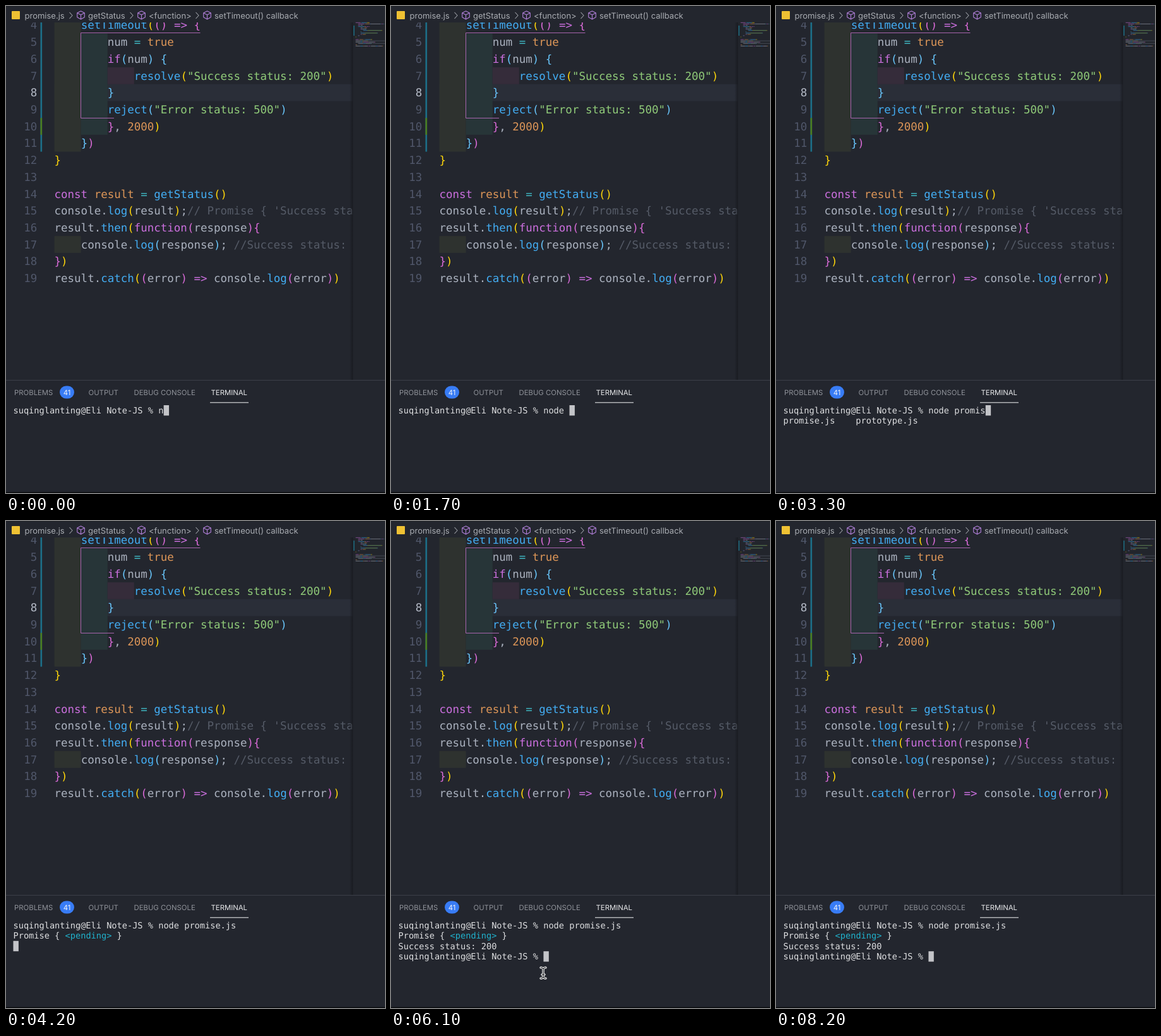
Recreate the animation shown at these times as an HTML page. Size 600x771 px, loop 8.3 s.

```html
<!DOCTYPE html>
<html lang="en">
<head>
<meta charset="utf-8">
<title>Promise in the terminal</title>
<style>
  html, body { margin: 0; width: 100%; height: 100%; overflow: hidden; background: #23262e; }
  svg { display: block; width: 600px; height: 771px; }
  text { white-space: pre; text-rendering: geometricPrecision; }
  .code { font: 17.47px "DejaVu Sans Mono", monospace; }
  .term { font: 13.64px "DejaVu Sans Mono", monospace; fill: #dedfe1; }
  .crumb { font: 13px Inter, sans-serif; fill: #a9acb2; }
  .tab { font: 11.35px Inter, sans-serif; fill: #8f9299; }
</style>
</head>
<body>
<svg id="stage" viewBox="0 0 600 771" xmlns="http://www.w3.org/2000/svg">
  <defs>
    <clipPath id="view"><rect y="26" width="549" height="566"/></clipPath>
    <linearGradient id="shade">
      <stop offset="0" stop-color="#15171c" stop-opacity="0"/>
      <stop offset="1" stop-color="#15171c" stop-opacity=".75"/>
    </linearGradient>
  </defs>
  <rect width="600" height="771" fill="#23262e"/>
  <g id="editor" clip-path="url(#view)"></g>
  <rect x="544" y="26" width="5.5" height="566" fill="url(#shade)"/>
  <g id="map"></g>
  <g id="crumbs"></g>
  <g id="panel"></g>
  <g id="terminal"></g>
  <g id="mouse" fill="none" stroke-linecap="round">
    <path id="beam" d="M-4-8.5Q-1-8.5 0-6.5Q1-8.5 4-8.5M0-6.5V6.5M-4 8.5Q-1 8.5 0 6.5Q1 8.5 4 8.5M-2 2.5H2" stroke="#f2f2f2" stroke-width="3"/>
    <use href="#beam"/>
    <path d="M-4-8.5Q-1-8.5 0-6.5Q1-8.5 4-8.5M0-6.5V6.5M-4 8.5Q-1 8.5 0 6.5Q1 8.5 4 8.5M-2 2.5H2" stroke="#15171b" stroke-width="1.1"/>
  </g>
</svg>
<script>
const LOOP = 8300, STEP = 100;
const ROW = 26.71, COL = 10.517, LEFT = 76.6;
const TROW = 16.4, TCOL = 8.212, TLEFT = 11.5;
const $ = id => document.getElementById(id);

function add(parent, tag, attrs, content) {
  const el = document.createElementNS("http://www.w3.org/2000/svg", tag);
  for (const k in attrs) el.setAttribute(k, attrs[k]);
  if (content !== undefined) el.textContent = content;
  parent.appendChild(el);
  return el;
}
const rect = (parent, x, y, width, height, fill, more) =>
  add(parent, "rect", { x, y, width, height, fill, ...more });

// "~k" switches to colour k for the text after it
const COLORS = {
  g: "#abb2bf", p: "#cb6fde", b: "#43adf3", o: "#dd9658", c: "#3fb6c1",
  s: "#90cb79", m: "#555b67", 1: "#ffd60a", 2: "#da6bd8", 3: "#69c6fb"
};
const CODE = [
  "~pfunction ~bgetStatus~1() {",
  "    ~preturn new ~oPromise~2(~3(~gresolve, reject~3) ~p=> ~3{",
  "    ~plet ~gnum",
  "    ~bsetTimeout~1(~2() ~p=> ~2{",
  "        ~gnum ~c= ~otrue",
  "        ~pif~3(~gnum~3) {",
  "            ~bresolve~1(~s\"Success status: 200\"~1)",
  "        ~3}",
  "        ~breject~3(~s\"Error status: 500\"~3)",
  "        ~2}~g, ~o2000~1)",
  "    ~3}~2)",
  "~1}",
  "",
  "~pconst ~oresult ~c= ~bgetStatus~1()",
  "~gconsole.~blog~1(~gresult~1)~g;~m// Promise { 'Success status: 200' }",
  "~gresult.~bthen~1(~pfunction~2(~gresponse~2){",
  "    ~gconsole.~blog~3(~gresponse~3)~g; ~m//Success status: 200",
  "~2}~1)",
  "~gresult.~bcatch~1(~2(~gerror~2) ~p=> ~gconsole.~blog~2(~gerror~2)~1)"
].map(line => {
  const [indent, ...parts] = line.split("~");
  let col = indent.length;
  return parts.map(p => {
    const token = { key: p[0], text: p.slice(1), col };
    col += token.text.length;
    return token;
  });
});

const mid = n => 57 + (n - 5) * ROW;
const colX = c => LEFT + c * COL;

function drawEditor() {
  const g = $("editor");
  const block = (c, from, to, fill) =>
    rect(g, colX(c), mid(from) - ROW / 2, 4 * COL, (to - from + 1) * ROW, fill);
  rect(g, LEFT, mid(8) - ROW / 2, 473, ROW, "#2a2e38");
  block(0, 3, 11, "#2e322f");
  block(0, 17, 17, "#2e322f");
  block(4, 5, 10, "#273538");
  block(8, 7, 7, "#352c3a");
  rect(g, 54.5, 20, 2.6, mid(11) + ROW / 2 - 20, "#1c6f88");
  rect(g, 54.5, mid(10) - ROW / 2, 2.6, ROW, "#4b7d20");
  add(g, "path", { d: "M307.5 42.5H118.5V177.5H171", fill: "none", stroke: "#a764ad" });

  CODE.forEach((tokens, i) => {
    const n = i + 1, y = mid(n) + 6.2;
    if (n < 4) return;
    add(g, "text", { class: "code", x: 49.3, y, "text-anchor": "end",
      fill: n === 8 ? "#b4bac6" : "#50576a" }, n);
    for (const t of tokens)
      add(g, "text", { class: "code", x: colX(t.col), y, fill: COLORS[t.key],
        "font-style": t.key === "m" ? "italic" : "normal" }, t.text);
  });
}

function drawMap() {
  const g = $("map");
  rect(g, 549.5, 26, 50.5, 566, "#22252c");
  CODE.forEach((tokens, i) => {
    for (const t of tokens)
      rect(g, 553.5 + t.col, 25.8 + i * 2.06, t.text.trim().length, 1.1,
        COLORS[t.key], { opacity: t.key === "m" ? 0.6 : 0.5 });
  });
  rect(g, 550.3, 31, 1.2, 16, "#1c7f98");
}

function drawCrumbs() {
  const g = $("crumbs");
  rect(g, 0, 0, 600, 1, "#1c1f25");
  rect(g, 9, 8, 13, 13, "#efc133", { rx: 1 });
  const label = (x, s) => add(g, "text", { class: "crumb", x, y: 19.6 }, s);
  const line = (d, stroke, width) => add(g, "path", { d, fill: "none", stroke,
    "stroke-width": width, "stroke-linejoin": "round" });
  label(29.5, "promise.js");
  for (const [x, s] of [[118.5, "getStatus"], [214.5, "<function>"], [318.5, "setTimeout() callback"]]) {
    line(`M${x - 18} 10l4.6 5l-4.6 5`, "#9da0a7", 1.1);
    line(`M${x} 8l5.8 2.9v6.8l-5.8 3.3l-5.8-3.3v-6.8zM${x - 5.8} 10.9l5.8 3l5.8-3M${x} 13.9v7.1`, "#b07fd8", 1.1);
    label(x + 11.5, s);
  }
}

function drawPanel() {
  const g = $("panel");
  rect(g, 0, 592, 600, 1, "#3b3f48");
  const tab = (x, s, fill) =>
    add(g, "text", { class: "tab", x, y: 615.7, style: fill ? `fill:${fill}` : "" }, s);
  tab(13, "PROBLEMS");
  rect(g, 85, 601.5, 23, 20, "#387cf5", { rx: 10 });
  add(g, "text", { class: "tab", x: 96.5, y: 615.8, "text-anchor": "middle",
    style: "fill:#f2f5fb" }, "41");
  tab(130.5, "OUTPUT");
  tab(202.5, "DEBUG CONSOLE");
  tab(324.5, "TERMINAL", "#e9eaec");
  rect(g, 323, 627.3, 61, 1.1, "#e4e5e7");
  rect(g, 0, 769.6, 600, 1.4, "#08090b");
}

const PROMPT = "suqinglanting@Eli Note-JS % ";
const TYPED = [
  [0, "n"], [100, "no"], [200, "nod"], [300, "node"], [500, "node "],
  [1900, "node p"], [2100, "node pr"], [2300, "node pro"], [2900, "node prom"],
  [3100, "node promi"], [3300, "node promis"], [3500, "node promise.js"]
];
const LISTED = 2500, ENTER = 3800, DONE = 5900;

const term = $("terminal");
const rows = [0, 1, 2, 3].map(i =>
  add(term, "text", { class: "term", x: TLEFT, y: 644.7 + i * TROW }));
const pending = add(term, "text", { class: "term", x: TLEFT + 10 * TCOL,
  y: 644.7 + TROW, style: "fill:#20b2cd" }, "<pending>");
const block = rect(term, 0, 0, 8.4, 16.4, "#c3c4c8");

// time, x, y of the pointer
const POINTER = [
  [4400, 262, 698], [4500, 254, 703], [4900, 241, 715.5], [6400, 241, 715.5],
  [6900, 97, 650], [7200, 97, 650], [7600, 60, 668]
];

function pointerAt(t) {
  const last = POINTER.length - 1;
  if (t < POINTER[0][0] || t > POINTER[last][0]) return null;
  let i = 0;
  while (i < last - 1 && t >= POINTER[i + 1][0]) i++;
  const [t0, x0, y0] = POINTER[i], [t1, x1, y1] = POINTER[i + 1];
  const u = (t - t0) / (t1 - t0), e = u * u * (3 - 2 * u);
  return [x0 + (x1 - x0) * e, y0 + (y1 - y0) * e];
}

function linesAt(t) {
  const typed = TYPED.filter(s => s[0] <= t).pop()[1];
  const lines = [PROMPT + typed, "", "", ""];
  if (t >= ENTER) lines[1] = "Promise {           }";
  else if (t >= LISTED) lines[1] = "promise.js    prototype.js";
  if (t >= DONE) {
    lines[2] = "Success status: 200";
    lines[3] = PROMPT;
  }
  return lines;
}

function render(now) {
  const t = Math.floor((now % LOOP) / STEP) * STEP;
  const lines = linesAt(t);
  rows.forEach((row, i) => {
    if (row.textContent !== lines[i]) row.textContent = lines[i];
  });
  pending.setAttribute("visibility", t >= ENTER ? "visible" : "hidden");

  const row = t >= DONE ? 3 : t >= ENTER ? 2 : 0;
  block.setAttribute("x", TLEFT + lines[row].length * TCOL);
  block.setAttribute("y", 632 + row * TROW);

  const p = pointerAt(t);
  $("mouse").setAttribute("visibility", p ? "visible" : "hidden");
  if (p) $("mouse").setAttribute("transform", `translate(${p[0]} ${p[1]})`);
}

drawEditor();
drawMap();
drawCrumbs();
drawPanel();

const start = performance.now();
function tick() {
  render(performance.now() - start);
  requestAnimationFrame(tick);
}
tick();
</script>
</body>
</html>
```
